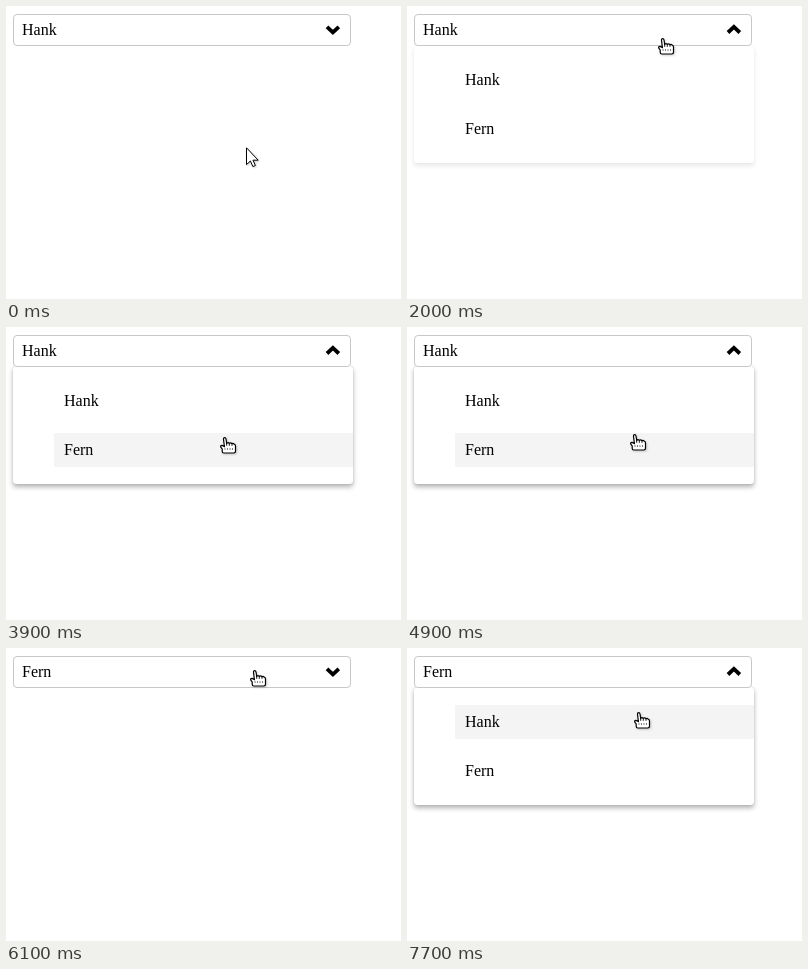
An HTML page that plays this animation: 395x293 px, repeating every 8 s.

```html
<!DOCTYPE html>
<html lang="en">
<head>
<meta charset="utf-8">
<title>Dropdown</title>
<style>
  html, body { margin: 0; width: 100%; height: 100%; overflow: hidden; background: #fff; }
  body { position: relative; font: 16px/18px "Liberation Serif", "Times New Roman", serif; color: #000; }
  div, svg { position: absolute; box-sizing: border-box; }
  #field { left: 7px; top: 8px; width: 338px; height: 32px; padding: 6px 8px; background: #fff; border: 1px solid #c8c8c8; border-radius: 4px; }
  #panel { left: 7px; top: 39px; width: 340px; background: #fff; border-radius: 3px; box-shadow: 0 3px 5px rgba(0, 0, 0, .3), 0 0 1px rgba(0, 0, 0, .3); }
  .item { left: 48px; width: 299px; height: 34px; padding: 8px 10px; }
  svg { left: 0; top: 0; width: 395px; height: 293px; }
</style>
</head>
<body>
<div id="panel"></div>
<div id="field"></div>
<div class="item" style="top:57px">Hank</div>
<div class="item" style="top:106px">Fern</div>
<svg viewBox="0 0 395 293">
  <path id="chevron" d="M-5.9-2.8L0 2.8 5.9-2.8" fill="none" stroke="#000" stroke-width="3.8"/>
  <g id="cursor" fill="#fff" stroke="#000" style="filter:drop-shadow(1px 1px 1px #0003)">
    <path id="arrow" d="M.5 .8V17.6L4.4 14 6.9 19.6 9.4 18.5 7 13.2H12.2Z"/>
    <g id="hand" transform="translate(-5)" stroke-width="1.2">
      <path d="M4.4 9.5L3.5 2.2Q3.4.7 4.6.7T6 2L6.7 6.2Q8 5 9.3 6.3 10.7 5.3 12 6.7 13.3 6 14.4 7.3 15.5 7.7 15.5 9V14.3Q15.5 16 13.8 16H3.6Q2.2 16 2.2 14.3V12L.7 10Q.4 8.3 2 8.4Z"/>
      <path d="M6.7 6V8.8M9.3 6.3V8.8M12 6.7V8.8" stroke-width=".9"/>
      <path d="M4.5 12H13.5" stroke-dasharray="1 1.5" stroke-width="1"/>
    </g>
  </g>
</svg>
<script>
const $ = id => document.getElementById(id);
const items = [...document.querySelectorAll('.item')];
const LOOP = 8000, STEP = 100, FADE = 330;
const OPEN = 2000, PICK = 5400, REOPEN = 6900;

// Pointer strokes: start time, end point, number of steps
const home = [240, 141];
const strokes = [
  [600, 119, 58, 3], [900, 168, 42, 1], [1100, 200, 32, 1], [1400, 256, 32, 5],
  [2600, 241, 51, 2], [2800, 228, 84, 2], [3200, 219, 124, 3], [3900, 219, 110, 1],
  [4200, 235, 78, 1], [4900, 220, 135, 2], [5800, 249, 22, 4], [7500, 232, 64, 3]
];

const clamp = v => Math.max(0, Math.min(1, v));
const ease = p => p * p * (3 - 2 * p);
const show = (el, on) => { el.style.display = on ? '' : 'none'; };

function pointer(t) {
  let [x, y] = home;
  for (const [start, toX, toY, steps] of strokes) {
    const p = ease(clamp(((t - start) / STEP + 1) / steps));
    x += (toX - x) * p;
    y += (toY - y) * p;
  }
  return [Math.round(x), Math.round(y)];
}

function draw(time) {
  const t = Math.floor(time % LOOP / STEP) * STEP;
  const open = t >= OPEN && t < PICK || t >= REOPEN;
  const since = t - (t >= REOPEN ? REOPEN : t >= PICK ? PICK : OPEN) + STEP;
  const fade = clamp(since / FADE);

  const [x, y] = pointer(t);
  const hovered = open ? [57, 106].findIndex(top => y >= top && y < top + 34) : -1;
  const justPicked = t === PICK;

  $('field').textContent = items[t < PICK ? 0 : 1].textContent;
  items.forEach((el, i) => {
    show(el, open);
    el.style.background = i === hovered ? '#f4f4f4' : 'none';
  });
  $('panel').style.height = open ? '118px' : '3px';
  $('panel').style.opacity = open ? fade : t >= PICK ? 1 - fade : 0;
  $('chevron').setAttribute('transform', `translate(326.9 23.7) scale(1 ${open || justPicked ? -1 : 1})`);

  const pointing = y > 8 && y < 40 || hovered >= 0 || justPicked;
  show($('hand'), pointing);
  show($('arrow'), !pointing);
  $('cursor').setAttribute('transform', `translate(${x} ${y})`);
}

let start;
function tick(now) {
  start ??= now;
  draw(now - start);
  requestAnimationFrame(tick);
}
draw(0);
requestAnimationFrame(tick);
</script>
</body>
</html>
```
